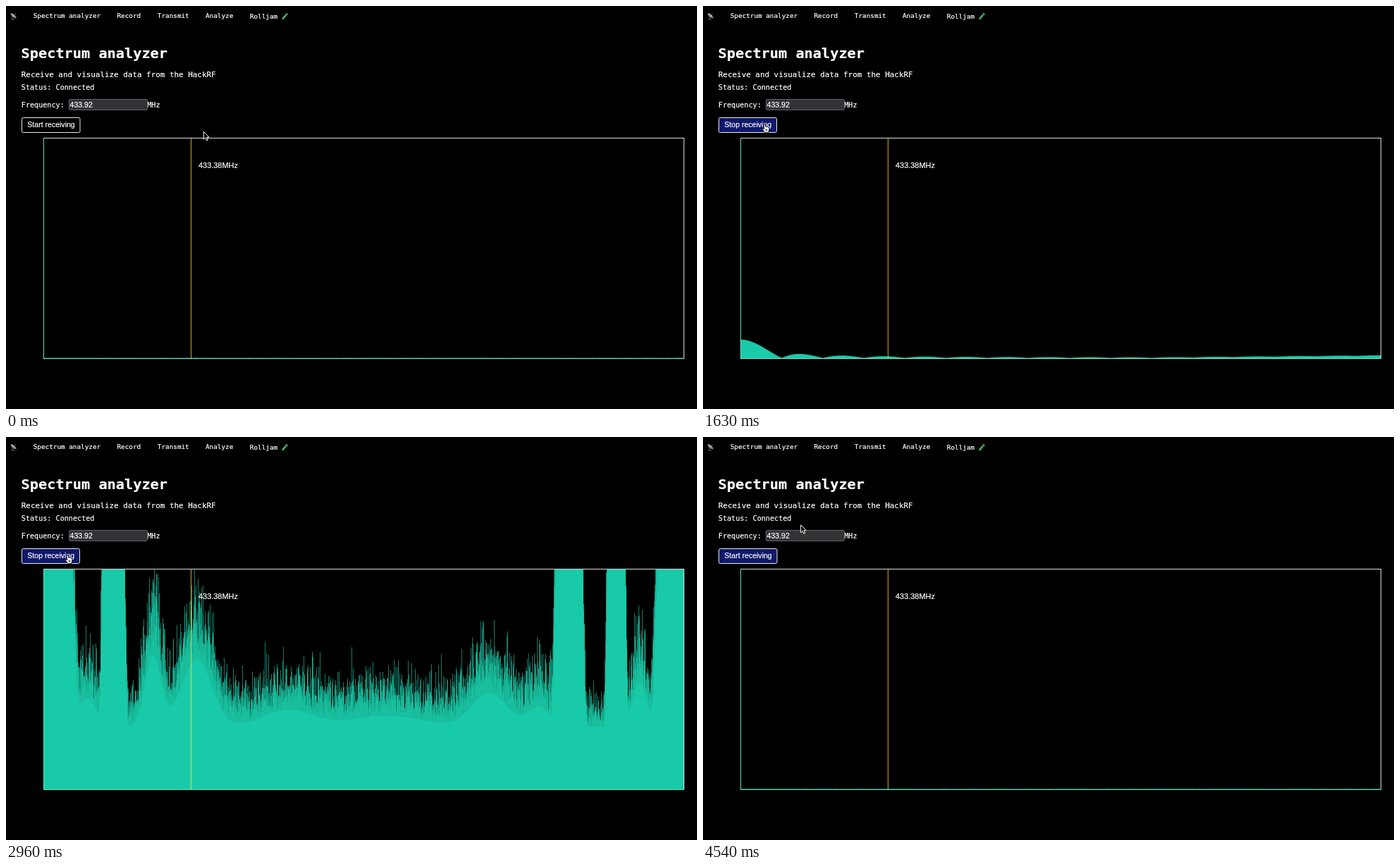
An HTML page with a canvas that plays this animation: 980x572 px, repeating every 4.58 s.

```html
<!DOCTYPE html>
<html lang="en">
<head>
<meta charset="utf-8">
<title>Spectrum analyzer</title>
<style>
html, body { margin: 0; width: 100%; height: 100%; overflow: hidden; background: #000; }
canvas, svg { position: absolute; left: 0; top: 0; display: block; }
text { fill: #fff; stroke: #fff; stroke-width: .2px; white-space: pre; }
.mono { font-family: "DejaVu Sans Mono", monospace; font-size: 10.15px; }
.nav { font-size: 9.33px; }
.lead { font-size: 10.92px; }
.title { font-size: 20.27px; font-weight: bold; }
.sans { font-family: "Liberation Sans", Arial, sans-serif; font-size: 10.55px; }
.mark { font-size: 10.95px; }

.btn { stroke: #e8e8e8; animation: hover 4.58s linear infinite; }
.start, .stop, .arrow, .hand { animation: 4.58s step-end infinite; }
.start { animation-name: start; }
.stop { animation-name: stop; }
.arrow { animation-name: arrow; }
.hand { animation-name: hand; }

@keyframes hover { 0%, 9% { fill: #000; } 12%, 100% { fill: #10186a; } }
@keyframes start { 31.87% { visibility: hidden; } 88.2% { visibility: visible; } }
@keyframes stop { 0%, 88.2%, 100% { visibility: hidden; } 31.87% { visibility: visible; } }
@keyframes arrow { 9% { visibility: hidden; } 97.8% { visibility: visible; } }
@keyframes hand { 0%, 97.8%, 100% { visibility: hidden; } 9% { visibility: visible; } }
</style>
</head>
<body>
<canvas id="plot" width="980" height="572"></canvas>
<svg width="980" height="572" viewBox="0 0 980 572">
  <g>
    <path d="M6.5 10 Q6.5 16.5 15 17.5 Z" fill="#8d8d8d"/>
    <path d="M6.5 10 Q12 10.5 15 17.5 Z" fill="#d4d4d4"/>
    <path d="M10.5 14 L14 10.8 M9.5 16 L8 19 H12" fill="none" stroke="#888" stroke-width=".8"/>
  </g>
  <g class="mono">
    <g class="nav">
      <text x="38.7" y="17.4">Spectrum analyzer</text>
      <text x="157.5" y="17.4">Record</text>
      <text x="214.8" y="17.4">Transmit</text>
      <text x="283" y="17.4">Analyze</text>
      <text x="345.8" y="18">Rolljam</text>
    </g>
    <text class="title" x="21.6" y="74.3">Spectrum analyzer</text>
    <text class="lead" x="21.8" y="101">Receive and visualize data from the HackRF</text>
    <text x="21.8" y="118.5">Status: Connected</text>
    <text x="21.8" y="143.5">Frequency:</text>
    <text x="200.2" y="143.5">MHz</text>
  </g>
  <g fill="none" stroke-linecap="round">
    <path d="M392.6 18 L398.2 11.4" stroke="#2f7d4a" stroke-width="2.8"/>
    <path d="M392.8 17.8 L396.4 13.6" stroke="#3fd068" stroke-width="1.6"/>
    <path d="M397 10.4 L399.4 12.4" stroke="#86a892" stroke-width=".9"/>
  </g>

  <rect x="89.5" y="132.5" width="111" height="15" rx="1" fill="#333" stroke="#606078"/>
  <text class="sans" x="90.6" y="143.6">433.92</text>

  <g class="start">
    <rect class="btn" x="22.5" y="158.5" width="82.5" height="21" rx="2"/>
    <text class="sans" x="30.3" y="172.2">Start receiving</text>
  </g>
  <g class="stop">
    <rect class="btn" x="22.5" y="158.5" width="82" height="21" rx="2"/>
    <text class="sans" x="30.3" y="172.2">Stop receiving</text>
  </g>
  <text class="sans mark" x="273" y="230.2">433.38MHz</text>

  <g id="cursor">
    <path class="arrow" d="M.3 .3 V11.2 L2.8 8.9 L4.5 12.8 L6.3 12 L4.6 8.2 H8 Z" fill="#000" stroke="#fff"/>
    <path class="hand" d="M-1 .8 Q0 -.6 1 .8 L1.9 4.6 Q3 3.8 3.6 4.7 Q4.8 4 5.2 5 Q6.6 4.6 6.8 6.2 Q7.2 9 6 11 V12.6 H.6 Q-.4 10.6 -2.8 8 Q-3 6.6 -1.4 7 L-.2 8 Z M2.2 7.6 V10.6 M3.8 7.6 V10.6" fill="#fff" stroke="#000" stroke-width=".8"/>
  </g>
</svg>
<script>
const LOOP = 4580, ON = 1460, OFF = 4040, LEAVE = 4420, STEP = 40;
const LEFT = 53, RIGHT = 962, TOP = 187, BASE = 501;
const ctx = document.getElementById('plot').getContext('2d');
const cursor = document.getElementById('cursor');

// Signal peaks: centre, half width and, for the soft ones, height
const strong = [[60, 37], [152, 17], [798, 21], [865, 14], [950, 30]];
const soft = [
  [115, 18, 50], [208, 16, 125], [270, 30, 120], [400, 50, 30],
  [540, 70, 20], [685, 35, 60], [755, 22, 35], [898, 14, 80]
];

function random(seed) {
  let s = Math.imul(seed + 1, 0x9E3779B1);
  return () => {
    s = s + 0x6D2B79F5 | 0;
    let v = Math.imul(s ^ s >>> 15, s | 1);
    v ^= v + Math.imul(v ^ v >>> 7, v | 61);
    return ((v ^ v >>> 14) >>> 0) / 4294967296;
  };
}

const hill = (x, mid, width, power) => Math.exp(-Math.pow(Math.abs(x - mid) / width, power));

function level(x) {
  let h = 112;
  for (const [mid, width] of strong) h += 400 * hill(x, mid, width, 8);
  for (const [mid, width, height] of soft) h += height * hill(x, mid, width, 2);
  return h;
}

function bar(x, height, alpha) {
  const h = Math.min(height, BASE - TOP - 1);
  ctx.globalAlpha = alpha;
  ctx.fillRect(x, BASE - h, 1, h);
}

// Three noisy bins share each pixel column
function burst(x, rnd) {
  const h = level(x);
  bar(x, h * .8, 1);
  for (let i = 0; i < 3; i++) {
    bar(x, h * (.8 + .3 * Math.sqrt(-Math.log(1 - rnd()))), .62);
  }
}

function ripple(x) {
  const u = Math.PI * (x - LEFT + .01) / 58.3;
  const rise = Math.max(0, (x - 640) / 100);
  bar(x, 1.5 + rise + 26 * Math.abs(Math.sin(u) / u), 1);
}

const idle = (x, rnd) => bar(x, 2, .3 + .3 * rnd());
const receive = (x, rnd) => bar(x, 2, .6 + .4 * rnd());

function signal(t) {
  if (t < ON || t >= OFF) return idle;
  if (t >= 1540 && t < 1750) return ripple;
  if (t >= 2660 && t < 3050) return burst;
  return receive;
}

function plot(t) {
  const live = t >= ON && t < OFF;
  const rnd = random(live ? 1 + Math.floor((t - ON) / STEP) : 0);
  const column = signal(t);
  ctx.globalAlpha = 1;
  ctx.fillStyle = '#000';
  ctx.fillRect(0, 0, 980, 572);

  ctx.fillStyle = '#1acaa8';
  for (let x = LEFT; x < RIGHT; x++) column(x, rnd);

  ctx.globalAlpha = 1;
  ctx.strokeStyle = '#dcdcdc';
  ctx.strokeRect(LEFT + .5, TOP + .5, RIGHT - LEFT - 1, BASE - TOP - 1);
  ctx.fillStyle = '#66dccc';
  ctx.fillRect(LEFT, TOP, 1, BASE - TOP);
  ctx.fillRect(LEFT, BASE - 1, RIGHT - LEFT, 1);
  ctx.fillStyle = 'rgba(255, 240, 50, .58)';
  ctx.fillRect(261.8, TOP + 1, 1.4, BASE - TOP - 1);
}

// Critically damped spring from 0 to 1
function spring(ms) {
  const k = Math.max(0, ms) * .009;
  return 1 - (1 + k) * Math.exp(-k);
}

function point(t) {
  const arrive = spring(t), leave = spring(t - LEAVE);
  const x = 280 - 193 * arrive + 173 * leave;
  const y = 178 - 11 * arrive - 143 * leave;
  cursor.setAttribute('transform', `translate(${x.toFixed(2)} ${y.toFixed(2)})`);
}

function frame(now) {
  const t = now % LOOP;
  plot(t);
  point(t);
  requestAnimationFrame(frame);
}
requestAnimationFrame(frame);
</script>
</body>
</html>
```
